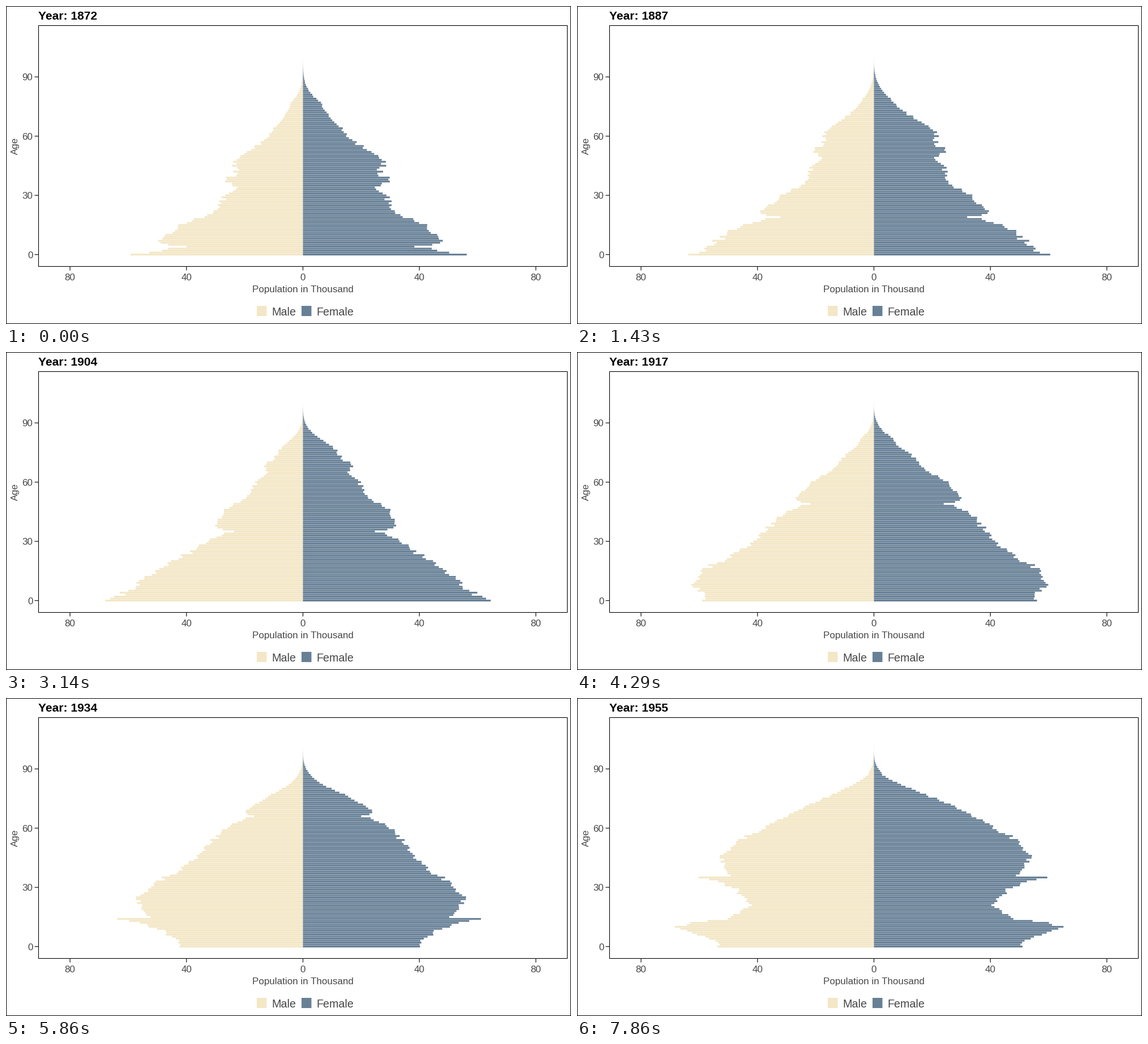
These frames come from a looping animation (998 px wide and 561 px high, 8 s). A matplotlib script:

```python
import numpy as np
import matplotlib.pyplot as plt
from matplotlib.animation import FuncAnimation
from matplotlib.collections import PolyCollection
from matplotlib.patches import Rectangle

W, H, DPI = 998, 561, 100
FRAMES, LOOP_MS = 56, 8000
START, END, YEARS_PER_FRAME = 1872, 1955, 150 / 99

MALE, FEMALE, GREY = "#F3E7C6", "#678096", "#474747"
X0, Y0 = 524.5, 438.5            # pixel position of zero people, age zero
PX_THOUSAND, PX_AGE = 5.1425, 3.482
HALF_BAR = 0.45 * PX_AGE
PT = 72 / DPI                    # points per pixel

plt.rcParams["font.family"] = "Liberation Sans"

# ---- population model: boys born per year, aged by a survival law ----
AGES = np.arange(0, 106)
BIRTHS = {                       # turning points, as bar length in pixels
    1785: 80, 1795: 145, 1800: 135, 1813: 175, 1820: 222, 1825: 258,
    1831: 222, 1834: 250, 1838: 212, 1852: 242, 1857: 285, 1866: 302,
    1868: 245, 1872: 300, 1877: 323, 1888: 320, 1900: 350, 1909: 350,
    1917: 304, 1919: 292, 1920: 354, 1922: 300, 1926: 260, 1934: 216,
    1941: 255, 1943: 320, 1945: 343, 1948: 323, 1952: 289, 1955: 278,
}
BORN = np.arange(1760, END + 1)
ROUGHNESS = np.linspace(0.05, 0.008, len(BORN))
NOISE = np.random.default_rng(4).normal(size=len(BORN)).clip(-1.5, 1.5)
COHORT = (np.interp(BORN, list(BIRTHS), list(BIRTHS.values()))
          * (1 + ROUGHNESS * NOISE))


def bell(x, center, width):
    return np.exp(-((x - center) / width) ** 2)


def survival(year):
    """Infant, constant and old-age risk, with progress and emigration."""
    t = (year - START) / (END - START)
    log_base = (-0.09 * (1 - np.exp(-AGES / 1.5)) - 0.013 * AGES
                - 0.0004 * np.exp(AGES / 10))
    delay = 1 + 3.3 * bell(AGES, 50, 22)
    progress = 0.66 * (1 - np.exp(-AGES / 20)) * t ** delay
    emigration = 0.16 * bell(year, 1900, 17) * bell(AGES, 29, 13)
    return np.exp(log_base) * (1 + progress - emigration)


def women_per_man(year):
    t = (year - START) / (END - START)
    return (0.95 + (0.4 - 0.2 * t) * (AGES / 70) ** (1.4 + t)
            + (0.15 - 0.1 * t) * np.exp((AGES - 80) / 10))


def population(year):
    men = np.interp(year - AGES, BORN, COHORT) * survival(year)
    return men, men * women_per_man(year)


# ---- stage in pixel coordinates ----
fig = plt.figure(figsize=(W / DPI, H / DPI), dpi=DPI, facecolor="white")
ax = fig.add_axes([0, 0, 1, 1])
ax.set_xlim(0, W)
ax.set_ylim(H, 0)
ax.axis("off")


def label(x, y, text, px, color=GREY, **kw):
    return ax.text(x, y, text, fontsize=px * PT, color=color,
                   va="baseline", **kw)


def outline(x, y, w, h, lw):
    ax.add_patch(Rectangle((x, y), w, h, fill=False, ec="black",
                           lw=lw * PT, zorder=4, snap=False))


def tick(xs, ys):
    ax.plot(xs, ys, color="#222222", lw=1.3 * PT, zorder=4,
            solid_capstyle="butt", snap=False)


outline(0.5, 0.5, W - 1, H - 1, 1)
outline(57.5, 34.5, 934, 425, 1.1)

for age in (0, 30, 60, 90):
    y = Y0 - age * PX_AGE
    tick([50.5, 57.5], [y, y])
    label(47.3, y + 6.3, str(age), 17, ha="right")

for value in (-80, -40, 0, 40, 80):
    x = X0 + value * PX_THOUSAND
    tick([x, x], [459.5, 466.5])
    label(x, 483.5, str(abs(value)), 17, ha="center")

label(X0, 504.5, "Population in Thousand", 17, ha="center")
label(20.5, 246.5, "Age", 17, ha="center", rotation=90,
      rotation_mode="anchor")

for x, color, name in ((443, MALE, "Male"), (522, FEMALE, "Female")):
    ax.add_patch(Rectangle((x, 529), 17.5, 18, fc=color, lw=0, snap=False))
    label(x + 26, 545.8, name, 19.8)

title = label(57.3, 24, "", 21, "black", weight="bold")


def bar_set(color):
    bars = PolyCollection([], facecolors=color, linewidths=0, zorder=2)
    bars.set_snap(False)
    return ax.add_collection(bars, autolim=False)


men_bars, women_bars = bar_set(MALE), bar_set(FEMALE)


def corners(ends):
    y = Y0 - AGES * PX_AGE
    top, bottom = y - HALF_BAR, y + HALF_BAR
    start = np.full(len(AGES), X0)
    xs = np.stack([start, ends, ends, start], 1)
    ys = np.stack([top, top, bottom, bottom], 1)
    return np.stack([xs, ys], 2)


def update(i):
    time = START + i * YEARS_PER_FRAME
    men, women = population(int(time))
    men_bars.set_verts(corners(X0 - men))
    women_bars.set_verts(corners(X0 + women))
    title.set_text(f"Year: {round(time)}")
    return men_bars, women_bars, title


anim = FuncAnimation(fig, update, frames=FRAMES, interval=LOOP_MS / FRAMES,
                     init_func=lambda: update(0), repeat=True)
plt.show()
```
